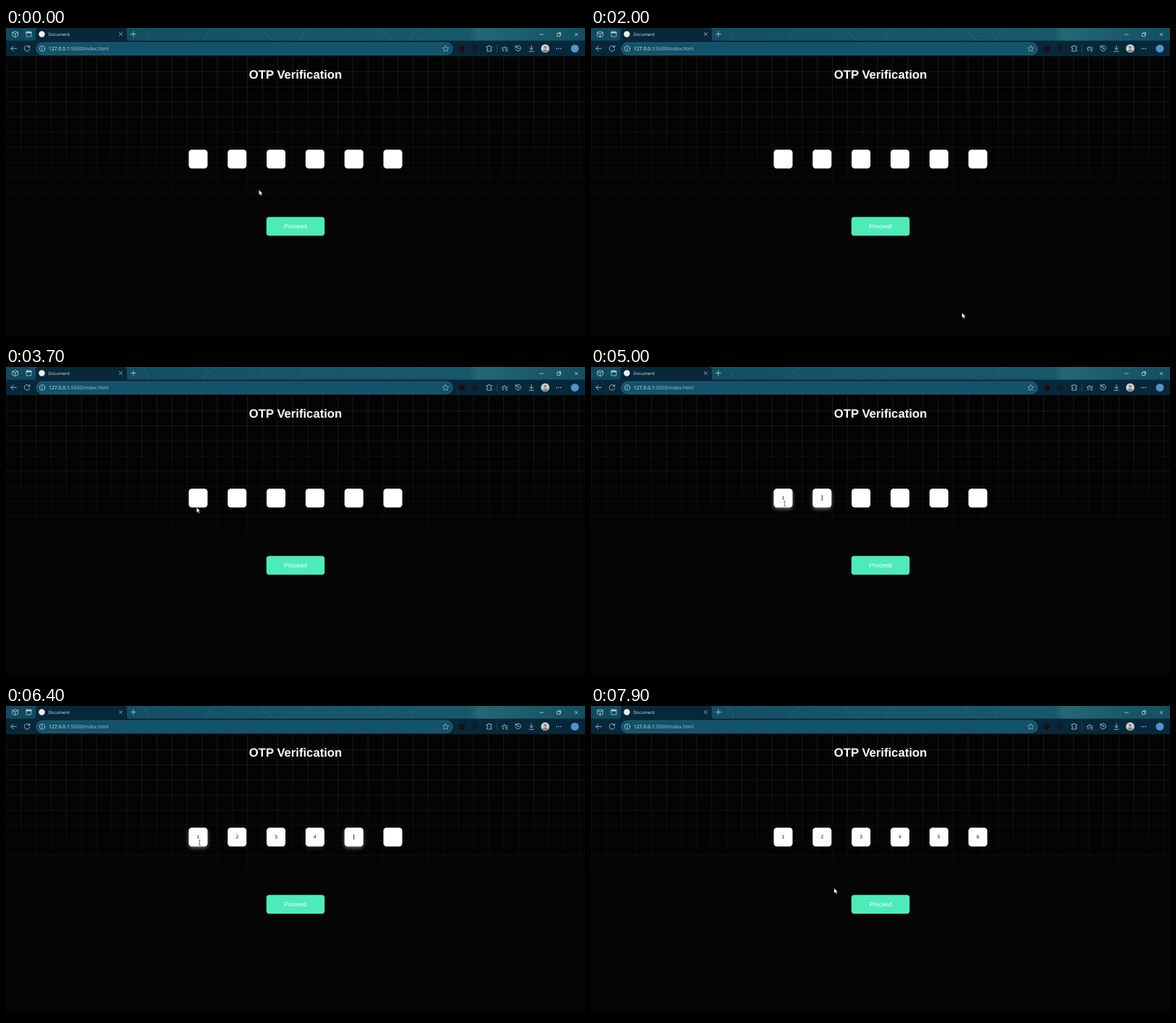
An HTML page for the animation above (8 s loop, 800 px wide and 430 px high).

```html
<!DOCTYPE html>
<html lang="en">
<head>
<meta charset="utf-8">
<title>OTP Verification</title>
<style>
html, body { margin: 0; width: 100%; height: 100%; overflow: hidden; background: #000; }
svg { display: block; width: 800px; height: 430px; }
text { text-rendering: geometricPrecision; }
.ui { font-family: "Open Sans", "Noto Sans", sans-serif; }
.page { font-family: "Liberation Sans", Arial, sans-serif; text-anchor: middle; }
.icon { fill: none; stroke: #c9d8de; stroke-width: .75; stroke-linecap: round; stroke-linejoin: round; }
</style>
</head>
<body>
<svg viewBox="0 0 800 430">
  <defs>
    <linearGradient id="frame">
      <stop offset="0" stop-color="#104a5e"/>
      <stop offset=".25" stop-color="#135064"/>
      <stop offset=".5" stop-color="#175669"/>
      <stop offset=".8" stop-color="#17576a"/>
      <stop offset=".815" stop-color="#266776"/>
      <stop offset=".9" stop-color="#1c5c6c"/>
      <stop offset="1" stop-color="#114f61"/>
    </linearGradient>
    <linearGradient id="fade" x2="0" y2="1">
      <stop offset="0" stop-color="#fff"/>
      <stop offset="1" stop-color="#000"/>
    </linearGradient>
    <mask id="gridFade" maskUnits="userSpaceOnUse" x="0" y="39" width="800" height="254">
      <rect y="39" width="800" height="254" fill="url(#fade)"/>
    </mask>
    <filter id="blur" x="-50%" y="-50%" width="200%" height="200%"><feGaussianBlur stdDeviation="2.4"/></filter>
  </defs>

  <!-- title bar -->
  <rect width="800" height="18" fill="url(#frame)"/>
  <path d="M188 0q9 8 9 18M272 18q5-11 18-18M352 0q5 10 18 18M404 18q6-11 16-18M517 0q5 9 18 18M557 18q4-10 14-18"
    fill="none" stroke="#4b8b98" stroke-width=".6" opacity=".5"/>
  <path d="M37 18q4 0 4-4V4q0-4 4-4H163q4 0 4 4V14q0 4 4 4z" fill="#06283a"/>
  <g class="icon">
    <path d="M9 6.2l3.5-1.7 4 1.7v4.6l-3.7 1.9L9 10.9zM9 6.2l3.7 1.8 3.8-1.8M12.7 8v4.5"/>
    <rect x="28" y="5" width="7" height="7" rx="1"/><path d="M28.500 6.300H34.500" stroke-width="1.800"/>
    <path d="M156.500 6.500l4 4m0-4l-4 4M172.500 8.300h7m-3.500-3.500v7"/>
    <path d="M737.500 9h5M761.800 7.500h3.500v4h-3.500zM763 6.300h3.500v3.800M786 7l4 4m0-4l-4 4"/>
  </g>
  <circle cx="49.500" cy="8.500" r="4.200" fill="#f1eeee"/>
  <text class="ui" x="58.500" y="10.700" font-size="6.050" fill="#dce7eb">Document</text>

  <!-- toolbar -->
  <rect y="17.500" width="800" height="21.500" fill="#06283a"/>
  <rect x="42" y="20.300" width="575" height="16.600" rx="8.300" fill="#12526a" stroke="#347487" stroke-width=".7"/>
  <g class="icon">
    <path d="M14.500 28.300h-7.500m3.200-3.300l-3.300 3.300 3.300 3.300"/>
    <path d="M32.500 26.500a3.800 3.800 0 1 0 .4 2.500M32.800 24.400v2.300h-2.300"/>
    <circle cx="50" cy="28.500" r="3.700"/><path d="M50 28v2.200M50 26.500v.1"/>
    <path d="M607.500 24.400l1.250 2.600 2.850.4-2.050 2 .5 2.850-2.550-1.350-2.550 1.350.5-2.850-2.050-2 2.850-.4z" opacity=".75"/>
    <path d="M664.500 25.500h2q0-1.500 1.200-1.500t1.200 1.500h2v2.100q-1.500 0-1.500 1.100t1.500 1.100v2.200h-6.400v-2q1.300 0 1.300-1.200t-1.300-1.200z"/>
    <path d="M678.300 23.500v10" stroke="#3b6170" stroke-width=".6"/>
    <path d="M687.500 31.300l-1 .6.4-2.300-1.800-1.700 2.400-.4 1.100-2.200 1.100 2.200M690.500 27.500h2.500M689.500 29.700h3.500M690.500 31.900h2.500"/>
    <path d="M704.200 26.200a3.800 3.800 0 1 1-.4 2.600M704 24.300v2.200h2.200M707.400 26.400v2.300h1.800"/>
    <path d="M726 24.300v5.700m-2.500-2.400l2.500 2.500 2.500-2.500M722.900 32.300h6.200"/>
    <path d="M760.800 28.500h.1m2.700 0h.1m2.700 0h.1" stroke-width="1.300"/>
  </g>
  <circle cx="630" cy="28.500" r="4" fill="#210b11"/>
  <circle cx="648.300" cy="28.500" r="4.200" fill="#17191b"/>
  <circle cx="745" cy="28.400" r="5.800" fill="#d2d0ce"/>
  <circle cx="745" cy="26.700" r="2" fill="#8b8784"/>
  <path d="M741.300 32.700q0-3.300 3.700-3.300t3.700 3.300q-3.700 2.500-7.400 0z" fill="#8b8784"/>
  <circle cx="786" cy="28.400" r="5.500" fill="#5790cb"/>
  <text class="ui" x="59" y="30.900" font-size="6.840" fill="#edf4f6">127.0.0.1<tspan fill="#b0c8d0">:5500/index.html</tspan></text>

  <!-- page -->
  <rect y="39" width="800" height="387" fill="#040404"/>
  <path id="grid" mask="url(#gridFade)" stroke="#fff" stroke-opacity=".17" stroke-width=".6"/>
  <g class="page">
    <text x="400" y="69.800" font-size="16.667" font-weight="700" fill="#fff">OTP Verification</text>
    <g id="boxes"></g>
    <rect x="359.800" y="261.200" width="80.400" height="26" rx="4" fill="#4eebba"/>
    <text x="400" y="276.900" font-size="8.333" fill="#fff">Proceed</text>
  </g>

  <g id="pointer">
    <path id="arrow" d="M0 0V7.200l1.700-1.500 1.100 2.600 1.300-.6-1.100-2.500h2.200z" fill="#fff" stroke="#111" stroke-width=".4"/>
    <path id="beam" d="M-1.400-3.600q1.400 0 1.400.8 0-.8 1.400-.8M0-2.800V2.800M-1.400 3.600q1.400 0 1.400-.8 0 .8 1.400.8" fill="none" stroke="#444" stroke-width=".7"/>
  </g>
</svg>
<script>
const LOOP = 8000, STEP = 100;
const PITCH = 53.8, SIZE = 26, LEFT = 252.5, TOP = 168.2;
const CELL = 20.833, PAGE_TOP = 39.6;
const FOCUS = 4200;
const typed = [4800, 5300, 5700, 6200, 6700, 7100];

// time, x, y of the pointer's hot spot
const path = [
  [0, 349.5, 223.7], [300, 349.5, 223.7], [1000, 278.7, 185.7],
  [1200, 290, 200], [1800, 512.5, 393.7], [2400, 512.5, 393.7],
  [3200, 300, 215], [3700, 263.3, 194], [4000, 267.5, 189],
  [7300, 267.5, 189], [7900, 335.8, 251.8], [8000, 335.8, 251.8]
];

const $ = id => document.getElementById(id);
const clamp = v => Math.max(0, Math.min(1, v));
const ease = p => p * p * (3 - 2 * p);

let lines = '';
for (let x = .2; x < 800; x += CELL) lines += `M${x} ${PAGE_TOP}V293`;
for (let y = PAGE_TOP + CELL + .2; y < 293; y += CELL) lines += `M0 ${y}H800`;
$('grid').setAttribute('d', lines);

$('boxes').innerHTML = typed.map((_, i) => {
  const x = LEFT + i * PITCH, mid = x + SIZE / 2;
  const rect = `width="${SIZE}" height="${SIZE}" rx="4.2"`;
  return `<g>
    <rect class="glow" x="${x}" y="${TOP + 2}" ${rect} fill="#fff" filter="url(#blur)"/>
    <rect x="${x}" y="${TOP}" ${rect} fill="#fff"/>
    <text class="digit" x="${mid}" y="183.4" font-size="6.667" fill="#111">${i + 1}</text>
    <path class="caret" d="M${mid} 177.2v7.7" stroke="#000" stroke-width=".8"/>
  </g>`;
}).join('');

const boxes = [...$('boxes').children].map(g => ({
  glow: g.querySelector('.glow'),
  digit: g.querySelector('.digit'),
  caret: g.querySelector('.caret')
}));

function pointerAt(t) {
  const i = path.findIndex((p, n) => n && t <= p[0]);
  const [t0, x0, y0] = path[i - 1], [t1, x1, y1] = path[i];
  const p = ease((t - t0) / (t1 - t0));
  return [x0 + (x1 - x0) * p, y0 + (y1 - y0) * p];
}

const inside = (x, y, i) => {
  const dx = x - LEFT - i * PITCH, dy = y - TOP;
  return dx > 0 && dx < SIZE && dy > 0 && dy < SIZE - .4;
};

// soft caret blink, counted from the moment of focus
const blink = age => clamp(.5 + 2 * Math.cos((age - 150) * Math.PI / 500));

function draw(t) {
  const [x, y] = pointerAt(t);
  let over = false;
  boxes.forEach((box, i) => {
    const start = i ? typed[i - 1] : FOCUS;
    const focused = t >= start && t < typed[i];
    const hover = inside(x, y, i);
    over = over || hover;
    const rise = clamp((t - start + STEP) / 300);
    const fall = t >= typed[i] ? 1 - clamp((t - typed[i]) / 300) : 0;
    box.glow.setAttribute('opacity', .42 * (hover ? 1 : focused ? rise : fall));
    box.digit.setAttribute('opacity', t >= typed[i] ? 1 : 0);
    box.caret.setAttribute('opacity', focused ? blink(t - start) : 0);
  });
  $('pointer').setAttribute('transform', `translate(${x} ${y})`);
  $('arrow').setAttribute('opacity', over ? 0 : 1);
  $('beam').setAttribute('opacity', over ? 1 : 0);
}

function tick() {
  draw(Math.floor(performance.now() % LOOP / STEP) * STEP);
  requestAnimationFrame(tick);
}
tick();
</script>
</body>
</html>
```
